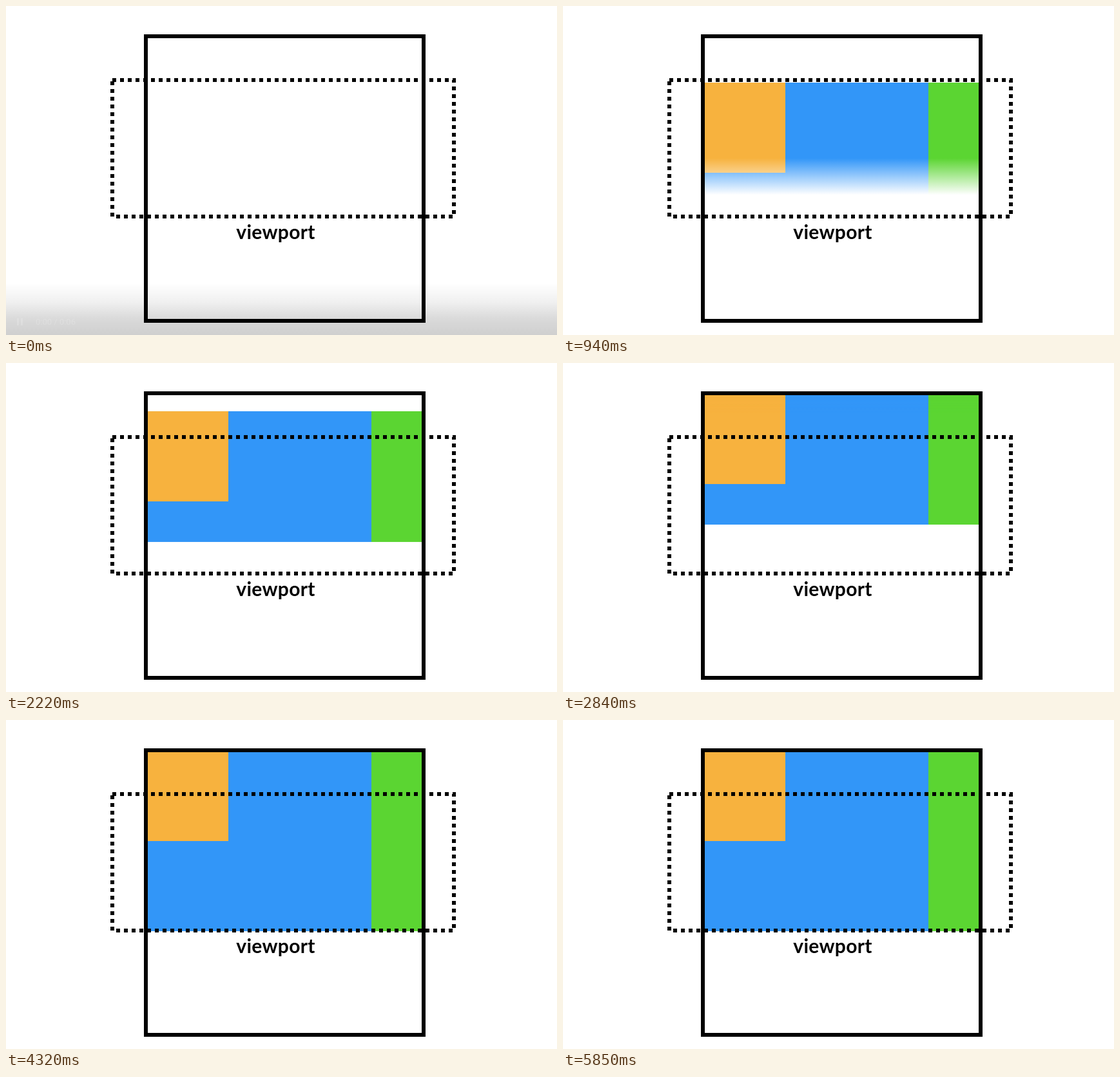
An HTML page that plays this animation: 855x511 px, repeating every 5.93 s.

```html
<!DOCTYPE html>
<html lang="en">
<head>
<meta charset="utf-8">
<title>Viewport</title>
<style>
  html, body { margin: 0; width: 100%; height: 100%; overflow: hidden; background: #fff; }
  svg { display: block; width: 855px; height: 511px; }
  .label { font: 700 30px Lato, "Open Sans", sans-serif; letter-spacing: .3px; text-anchor: middle; }
  .clock { font: 13px Roboto, Arial, sans-serif; fill: #fff; }
</style>
</head>
<body>
<svg viewBox="0 0 855 511" xmlns="http://www.w3.org/2000/svg">
  <defs>
    <linearGradient id="fadeA" gradientUnits="userSpaceOnUse" x1="0" x2="0">
      <stop offset="0" stop-color="#fff"/><stop offset="1" stop-color="#000"/>
    </linearGradient>
    <linearGradient id="fadeB" gradientUnits="userSpaceOnUse" x1="0" x2="0">
      <stop offset="0" stop-color="#fff"/><stop offset="1" stop-color="#000"/>
    </linearGradient>
    <mask id="maskA" maskUnits="userSpaceOnUse" x="0" y="0" width="855" height="511" style="mask-type:luminance">
      <rect width="855" height="511" fill="url(#fadeA)"/>
    </mask>
    <mask id="maskB" maskUnits="userSpaceOnUse" x="0" y="0" width="855" height="511" style="mask-type:luminance">
      <rect width="855" height="511" fill="url(#fadeB)"/>
    </mask>
    <clipPath id="inside"><rect x="220" y="50" width="425" height="436"/></clipPath>
    <linearGradient id="shadeFill" x1="0" y1="0" x2="0" y2="1">
      <stop offset="0" stop-opacity="0"/>
      <stop offset=".37" stop-opacity=".06"/>
      <stop offset=".68" stop-opacity=".145"/>
      <stop offset="1" stop-opacity=".19"/>
    </linearGradient>
  </defs>

  <rect width="855" height="511" fill="#fff"/>

  <g id="shade">
    <rect y="430" width="855" height="81" fill="url(#shadeFill)"/>
    <g opacity=".18">
      <path d="M17 485h3v11h-3zM23 485h3v11h-3z" fill="#fff"/>
      <text class="clock" x="46" y="495">0:00 / 0:06</text>
    </g>
  </g>

  <g clip-path="url(#inside)">
    <g mask="url(#maskA)">
      <g id="short">
        <rect x="220" y="119" width="347" height="203" fill="#3296f8"/>
        <rect x="567" y="119" width="78" height="203" fill="#5bd532"/>
        <rect x="220" y="119" width="125" height="140" fill="#f7b23e"/>
      </g>
    </g>
    <g id="tall" mask="url(#maskB)">
      <rect x="220" y="50" width="347" height="278" fill="#3296f8"/>
      <rect x="567" y="50" width="78" height="278" fill="#5bd532"/>
      <rect x="220" y="50" width="125" height="138" fill="#f7b23e"/>
    </g>
  </g>

  <g fill="none" stroke="#000" stroke-width="6">
    <path d="M165 115H695V327H165Z" stroke-dasharray="6 6"/>
    <rect x="217" y="47" width="431" height="442"/>
  </g>
  <text class="label" x="418.5" y="362">viewport</text>
</svg>

<script>
  const LOOP = 5930;
  const SOFT = 57;
  const $ = id => document.getElementById(id);

  const progress = (t, start, length) => Math.min(1, Math.max(0, (t - start) / length));
  const ease = p => p * p * (3 - 2 * p);

  // Soft edge that travels down from top until the whole height is shown
  function wipe(fade, top, height, p) {
    const edge = top + ease(p) * (height + SOFT);
    fade.setAttribute("y1", edge - SOFT);
    fade.setAttribute("y2", edge);
  }

  function draw(t) {
    $("shade").setAttribute("opacity", 1 - progress(t, 130, 300));

    const first = progress(t, 325, 1000);
    wipe($("fadeA"), 119, 203, first);
    $("short").style.display = first > 0 ? "" : "none";

    const lift = -71 * ease(progress(t, 1640, 1000));
    $("short").setAttribute("transform", `translate(0 ${lift.toFixed(2)})`);

    const second = progress(t, 2667, 1000);
    wipe($("fadeB"), 50, 278, second);
    $("tall").style.display = second > 0 ? "" : "none";
  }

  const begin = performance.now();
  function tick() {
    draw((performance.now() - begin) % LOOP);
    requestAnimationFrame(tick);
  }
  draw(0);
  requestAnimationFrame(tick);
</script>
</body>
</html>
```
